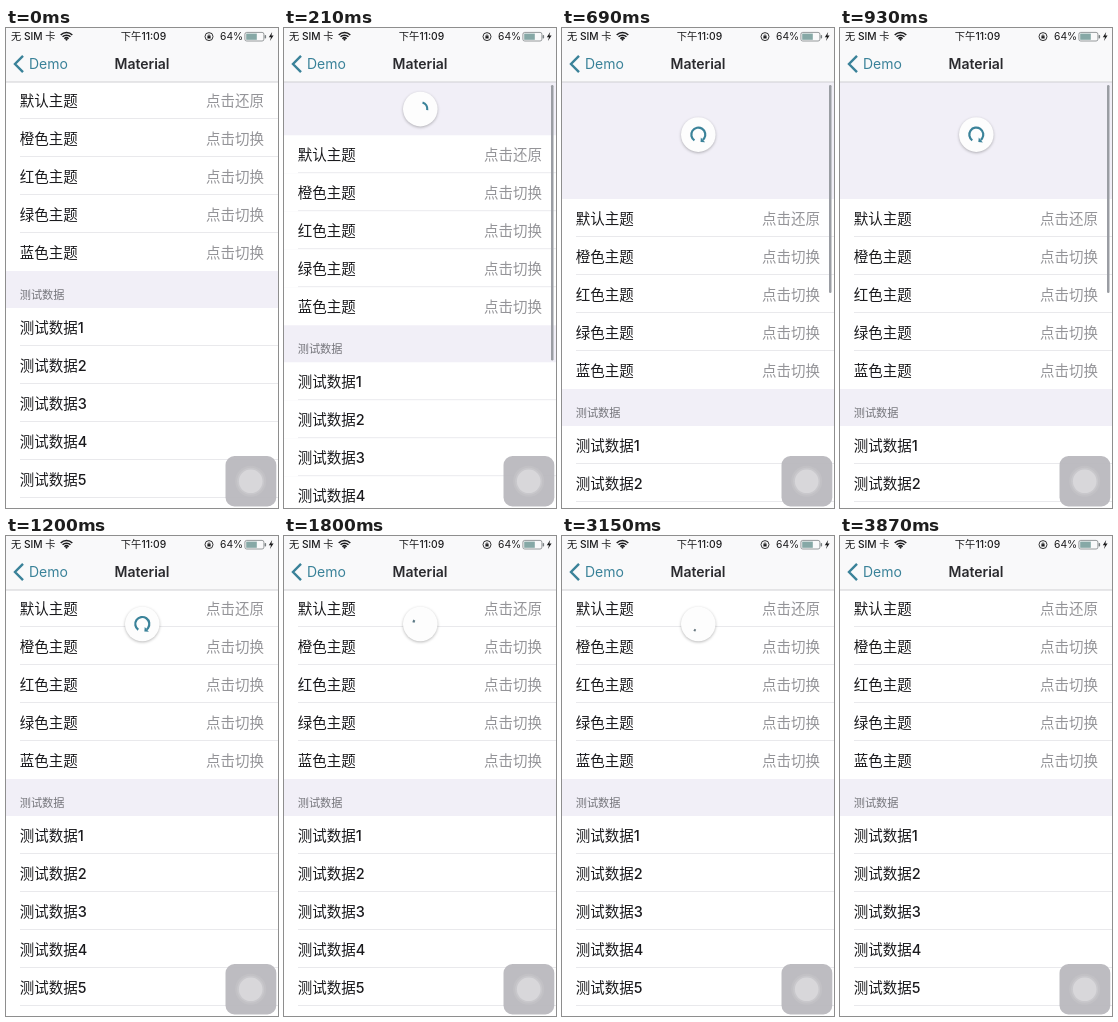
Animation, 272 px wide and 480 px high, one loop 3900 ms. Source, as an HTML page with a canvas:

```html
<!DOCTYPE html>
<html lang="zh-CN">
<head>
<meta charset="utf-8">
<style>
html, body { margin: 0; width: 100%; height: 100%; overflow: hidden; background: #fff; }
canvas { display: block; width: 272px; height: 480px; }
</style>
</head>
<body>
<canvas id="stage"></canvas>
<script>
const W = 272, H = 480, LOOP = 3900;
const NAV = 54, ROW = 38, HEAD = 37;
const TEAL = '#3a8299';
const FONT = 'Inter, "Noto Sans CJK SC", "Noto Sans CJK", "Noto Sans", sans-serif';
const RELEASE = 960, SETTLED = 1190, SPIN = 1215, HALF = 666, DONE = 3300;
const themes = ['默认', '橙色', '红色', '绿色', '蓝色'];

const canvas = document.getElementById('stage');
const ctx = canvas.getContext('2d');
const dpr = window.devicePixelRatio || 1;
canvas.width = W * dpr;
canvas.height = H * dpr;

const clamp = v => Math.max(0, Math.min(1, v));
const span = (t, a, b) => clamp((t - a) / (b - a));
const smooth = p => p * p * (3 - 2 * p);
const mix = (a, b, p) => a + (b - a) * p;

function track(keys, t) {
  if (t <= keys[0][0]) return keys[0][1];
  for (let i = 1; i < keys.length; i++) {
    const [t0, v0] = keys[i - 1], [t1, v1] = keys[i];
    if (t <= t1) return mix(v0, v1, (t - t0) / (t1 - t0));
  }
  return keys[keys.length - 1][1];
}

const PULL = [[15, 0], [210, 54], [340, 88], [480, 114], [620, 118]];
const START = [[15, -120], [210, -72], [480, 85], [700, 125]];
const SWEEP = [[15, 0], [210, 78], [430, 285]];

function text(s, x, y, size, color, align = 'left', weight = 400) {
  ctx.font = `${weight} ${size}px ${FONT}`;
  ctx.fillStyle = color;
  ctx.textAlign = align;
  ctx.fillText(s, x, y);
}

function rect(x, y, w, h, color) {
  ctx.fillStyle = color;
  ctx.fillRect(x, y, w, h);
}

function disc(x, y, r, color) {
  ctx.fillStyle = color;
  ctx.beginPath();
  ctx.arc(x, y, r, 0, Math.PI * 2);
  ctx.fill();
}

function box(x, y, w, h, r, color) {
  ctx.fillStyle = color;
  ctx.beginPath();
  ctx.roundRect(x, y, w, h, r);
  ctx.fill();
}

function poly(points, color, width) {
  ctx.beginPath();
  points.forEach(([x, y]) => ctx.lineTo(x, y));
  if (width) {
    ctx.strokeStyle = color;
    ctx.lineWidth = width;
    ctx.stroke();
  } else {
    ctx.fillStyle = color;
    ctx.fill();
  }
}

function arc(x, y, r, from, to, color, width) {
  ctx.strokeStyle = color;
  ctx.lineWidth = width;
  ctx.beginPath();
  ctx.arc(x, y, r, from, to);
  ctx.stroke();
}

function drawList(off) {
  rect(0, NAV, W, H, '#f1eff7');
  let y = NAV - 1 + off;
  const row = (label, action, last) => {
    rect(0, y, W, ROW, '#fff');
    text(label, 13.7, y + 24.6, 14.5, '#1a1a1d', 'left', 500);
    if (action) text(action, 258, y + 24.6, 14.5, '#949498', 'right');
    if (!last) rect(14, y + ROW - 1, W, 1, '#e9e9ec');
    y += ROW;
  };
  themes.forEach((s, i) => row(s + '主题', i ? '点击切换' : '点击还原', i === themes.length - 1));
  text('测试数据', 13.7, y + 28.2, 11.2, '#737379');
  y += HEAD;
  for (let n = 1; n <= 6; n++) row('测试数据' + n);
}

function drawScrollbar(t, off) {
  const alpha = span(t, 15, 60) * (1 - span(t, 1010, 1180));
  if (!alpha) return;
  ctx.globalAlpha = alpha;
  box(267, 57, 2.5, 333 - off * 1.06, 1.2, '#9a9da3');
  ctx.globalAlpha = 1;
}

// start angle and sweep in degrees, and whether the arrowhead shows
function ringPose(t) {
  if (t < SPIN) return [track(START, t), track(SWEEP, t), true];
  const age = t - SPIN;
  const turn = 125 + age * 0.27;
  if (age < HALF) {
    const p = smooth(age / HALF);
    return [turn + 280 * p, 285 - 275 * p, false];
  }
  const cycle = (age - HALF) / (2 * HALF);
  const n = Math.floor(cycle), f = cycle - n;
  const head = 270 * smooth(clamp(f * 2));
  const tail = 270 * smooth(clamp(f * 2 - 1));
  return [turn + 280 + 270 * n + tail, 10 + head - tail, false];
}

function drawSpinner(t, off) {
  const scale = 1 - span(t, DONE, DONE + 150);
  if (t < 15 || scale <= 0) return;
  const pulled = Math.min(off - 18, 5.4 + 0.4 * off);
  const back = 1 - Math.pow(1 - span(t, RELEASE, SETTLED), 2);
  const cy = NAV + (t < RELEASE ? pulled : mix(52.5, 34, back));

  ctx.save();
  ctx.translate(136.3, cy);
  ctx.scale(scale, scale);
  ctx.shadowColor = 'rgba(0,0,0,.28)';
  ctx.shadowBlur = 3 * dpr;
  ctx.shadowOffsetY = dpr;
  disc(0, 0, 17.3, '#fdfdfd');
  ctx.shadowColor = 'transparent';

  const [start, sweep, arrow] = ringPose(t);
  const p = span(t, SPIN + HALF * 0.5, SPIN + HALF);
  const color = `rgb(${mix(58, 104, p)},${mix(130, 120, p)},${mix(153, 128, p)})`;
  const a = start * Math.PI / 180, b = (start + sweep) * Math.PI / 180;
  const r = 7;
  arc(0, 0, r, a, b, color, 2.2);
  const size = arrow ? clamp((sweep - 100) / 185) : 0;
  if (size) {
    ctx.rotate(b);
    ctx.translate(r, 0);
    poly([[-3.2 * size, 0], [3.2 * size, 0], [0, 3.2 * size]], color);
  }
  ctx.restore();
}

function drawBars() {
  rect(0, 0, W, NAV, '#f9f9fa');
  rect(0, NAV - 0.5, W, 1, '#cfd0d3');

  const ink = '#1c1c1e';
  text('无 SIM 卡', 5, 12.3, 10.2, ink, 'left', 500);
  for (const r of [3, 5.6, 8.2]) arc(60.5, 12.8, r, -Math.PI * 0.75, -Math.PI * 0.25, ink, 1.5);
  disc(60.5, 11.6, 1.1, ink);
  text('下午11:09', 137.5, 12.3, 10.3, ink, 'center', 500);

  arc(203, 8.6, 4, 0, Math.PI * 2, ink, 0.9);
  rect(201.4, 8.1, 3.2, 2.4, ink);
  arc(203, 8, 1.1, Math.PI, 0, ink, 0.8);

  text('64%', 214, 12.3, 10.3, ink);
  ctx.strokeStyle = '#7b8083';
  ctx.lineWidth = 0.8;
  ctx.beginPath();
  ctx.roundRect(238.9, 4.4, 19, 8.6, 1.8);
  ctx.stroke();
  rect(240.2, 5.6, 10.6, 6.2, '#86a8a6');
  box(258.6, 7, 1.5, 3.4, 0.7, '#7b8083');
  poly([[266.2, 4], [262.8, 9.2], [265, 9.2], [263.9, 13], [267.6, 7.6], [265.4, 7.6]], ink);

  poly([[17, 27.9], [9, 36], [17, 44.1]], TEAL, 2.4);
  text('Demo', 23, 41, 14, TEAL);
  text('Material', 136, 41, 14, '#2a2a2e', 'center', 600);
}

function drawTouch() {
  box(219.5, 428, 50.8, 50.5, 9, 'rgba(186,185,190,.95)');
  disc(244.7, 453.3, 15.5, '#c2c1c5');
  disc(244.7, 453.3, 13.5, '#c9c8cc');
  disc(244.7, 453.3, 11.8, '#d8d7da');
}

function draw(t) {
  const back = span(t, RELEASE, SETTLED);
  const off = track(PULL, t) * Math.pow(1 - back, 2);
  ctx.setTransform(dpr, 0, 0, dpr, 0, 0);
  rect(0, 0, W, H, '#fff');
  drawList(off);
  drawScrollbar(t, off);
  drawSpinner(t, off);
  drawBars();
  drawTouch();
}

const begin = performance.now();
function tick() {
  draw((performance.now() - begin) % LOOP);
  requestAnimationFrame(tick);
}
tick();
</script>
</body>
</html>
```
